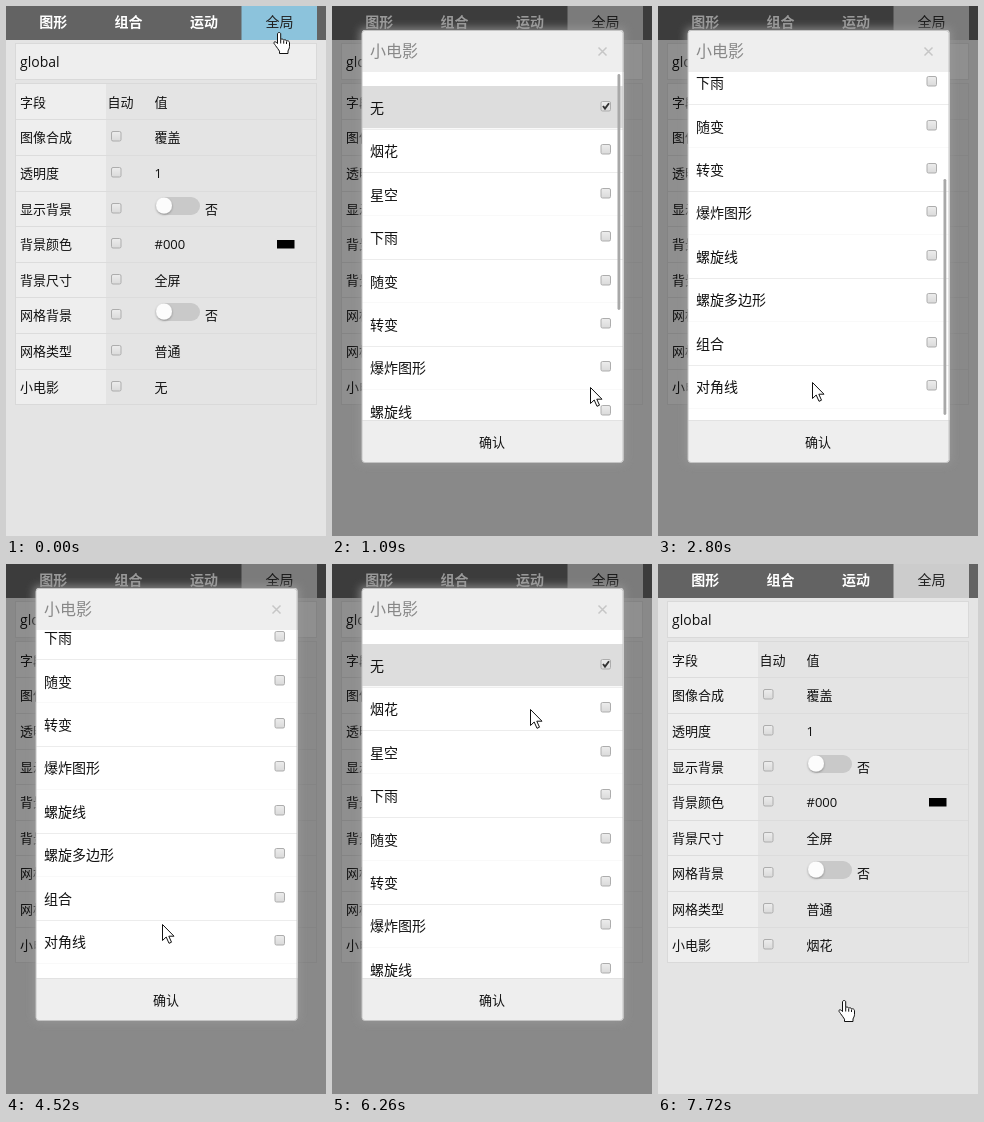
These frames come from a looping animation (320x530 px, 8000 ms). An HTML page:

```html
<!DOCTYPE html>
<html lang="zh-CN">
<head>
<meta charset="utf-8">
<title>全局设置</title>
<style>
html, body { margin: 0; width: 100%; height: 100%; overflow: hidden; background: #e4e4e4; }
svg { display: block; width: 100%; height: 100%; }
text { font: 13px "Open Sans", "Noto Sans CJK SC", "Noto Sans CJK", sans-serif; fill: #111; white-space: pre; }
.tab { font-size: 14px; font-weight: 600; fill: #fff; text-anchor: middle; }
.tab.on { font-weight: 400; fill: #222; }
.item { font-size: 14px; }
.title { font-size: 16px; fill: #888; }
.mid { text-anchor: middle; }
</style>
</head>
<body>
<svg viewBox="0 0 320 530">
  <defs>
    <linearGradient id="box" x2="0" y2="1"><stop stop-color="#ededed"/><stop offset="1" stop-color="#dadada"/></linearGradient>
    <filter id="blur" x="-20%" y="-20%" width="140%" height="140%"><feGaussianBlur stdDeviation="4"/></filter>
    <filter id="soft" x="-30%" y="-30%" width="160%" height="160%"><feDropShadow dx="0" dy="1" stdDeviation="1" flood-opacity=".35"/></filter>
    <clipPath id="view"><rect x="30" y="66" width="261" height="348"/></clipPath>
  </defs>
  <g id="page"></g>
  <g id="modal">
    <rect width="320" height="530" opacity=".4"/>
    <rect x="28" y="22" width="265" height="436" rx="4" fill="#999" opacity=".8" filter="url(#blur)"/>
    <rect x="30" y="24" width="261.500" height="432.500" rx="3" fill="#eee"/>
    <rect x="30" y="66" width="261.500" height="348" fill="#fff"/>
    <g clip-path="url(#view)">
      <g id="list"></g>
      <rect id="bar" x="285.500" width="2.800" height="236" rx="1.400" fill="#a8a8a8"/>
    </g>
    <path d="M30 414.500H291" stroke="#e2e2e2"/>
    <rect x="30" y="24.500" width="261" height="432" rx="3" fill="none" stroke="#c4c4c4"/>
    <text class="title" x="38" y="51">小电影</text>
    <path d="M266.500 41.500l8 8m0-8l-8 8" stroke="#c6c6c6" stroke-width="1.500"/>
    <text class="mid" x="160" y="441">确认</text>
  </g>
  <g id="cursor" fill="#fff" stroke="#111" stroke-linejoin="round">
    <path id="arrow" d="M.5 .5V16.500L4.200 13 7 19.300 9.500 18.200 6.800 12.200H12Z"/>
    <g id="hand" transform="translate(-5 0)">
      <path d="M4.500 2c0-2 3.200-2 3.200 0v5.500c.8-.8 2.600-.5 3 .6c1-.7 2.500-.3 2.800.8c1.300-.4 3 .2 3 1.800v3.800c0 2-1 3-1.500 4.500v2.500H6.500v-2.300c-1-2-2.800-3.700-4-5.700c-1-1.500-2-2.300-1.500-3.200c.8-1.100 2.500-.2 3.500 1.300z"/>
      <path d="M7.700 7.500v4M10.700 8.500v3.200M13.500 9.500v2.500" fill="none"/>
    </g>
  </g>
</svg>
<script>
const LOOP = 8000, OPEN = 1090, PICK = 6270, CONFIRM = 7420, CLOSE = 7570;
const ROW = 43.45, films = "无 烟花 星空 下雨 随变 转变 爆炸图形 螺旋线 螺旋多边形 组合 对角线".split(" ");
const $ = id => document.getElementById(id);
const show = (id, on) => $(id).setAttribute("visibility", on ? "inherit" : "hidden");
const text = (x, y, s, attrs = "") => `<text x="${x}" y="${y}" ${attrs}>${s}</text>`;
const rect = (x, y, w, h, fill, attrs = "") => `<rect x="${x}" y="${y}" width="${w}" height="${h}" fill="${fill}" ${attrs}/>`;
const check = (x, y) => rect(x + .5, y + .5, 9.500, 9.500, "url(#box)", 'rx="1.500" stroke="#adadad"');
const line = (x1, x2, y, color) => `<path d="M${x1} ${y}H${x2}" stroke="${color}"/>`;

function buildPage() {
  let s = rect(0, 0, 320, 530, "#e4e4e4") + rect(0, 0, 320, 34, "#636363");
  s += rect(235.500, 0, 75.500, 34, "#ccc", 'id="tab"');
  ["图形", "组合", "运动", "全局"].forEach((name, i) =>
    s += text(47.200 + 75.400 * i, 21, name, `class="tab${i == 3 ? " on" : ""}"`));
  s += rect(9.500, 37.500, 301, 36, "#eee", 'stroke="#d9d9d9"') + text(14, 61, "global", 'class="item"');
  s += rect(9.500, 77.500, 301, 321, "#e4e4e4", 'stroke="#d9d9d9"') + rect(10, 78, 90, 320, "#eee");

  const rows = [["字段", "值"], ["图像合成", "覆盖"], ["透明度", "1"], ["显示背景"], ["背景颜色", "#000"],
    ["背景尺寸", "全屏"], ["网格背景"], ["网格类型", "普通"], ["小电影", "无"]];
  rows.forEach(([label, value], i) => {
    const y = Math.round(95.800 + 35.600 * i);
    s += text(14, y + 5, label);
    s += i ? check(105, y - 6) + line(10, 310, y - 17.500, "#dcdcdc") : text(101.500, y + 5, "自动");
    if (value) s += text(148.500, y + 5, value, i == 8 ? 'id="film"' : "");
    else s += rect(150, y - 12, 44, 18, "#c9c9c9", 'rx="9"')
      + `<circle cx="158" cy="${y - 3.500}" r="8" fill="#fcfcfc" filter="url(#soft)"/>` + text(199, y + 5, "否");
  });
  $("page").innerHTML = s + rect(271, 234, 17.500, 8.500, "#000");
}

function buildList() {
  let s = rect(30, 80, 261, 43.500, "#ddd", 'id="chosen"');
  films.forEach((name, i) => {
    const mid = 101.700 + ROW * i;
    s += line(30, 291, Math.round(80 + ROW * (i + 1)) - .5, i % 2 ? "#ececec" : "#f9f9f9");
    s += text(38, mid + 5, name, 'class="item"') + check(268.500, Math.round(mid - 7));
  });
  s += '<path id="tick" d="M271 100l2 2.600 4-5.300" fill="none" stroke="#333" stroke-width="1.900"/>';
  $("list").innerHTML = s;
}

// Share of a move done at time t, when it runs from a to b in n visible steps
const part = (t, a, b, n) => t < a ? 0 : t >= b ? 1 : (1 + Math.floor((t - a) / (b - a) * (n - 1))) / n;

// Each move: [start, end, steps, ...target]
const track = (from, moves, ease) => t => moves.reduce((v, [a, b, n, ...to]) => {
  const p = ease(part(t, a, b, n));
  return v.map((c, i) => c + (to[i] - c) * p);
}, from);

const smooth = p => p * p * (3 - 2 * p);
const pointer = track([272, 26], [
  [120, 810, 6, 263, 379], [1090, 1090, 1, 258, 381], [1240, 2110, 7, 154, 376],
  [3230, 3650, 4, 155, 363], [4520, 4520, 1, 156, 360], [5330, 5600, 3, 195, 206],
  [5720, 6020, 3, 198, 145], [6400, 7030, 6, 187, 421], [7280, 7280, 1, 187, 422],
  [7420, 7720, 3, 185, 436]], smooth);
const scroll = track([0], [[2260, 2920, 6, 158], [4920, 5200, 3, 0]], p => 1 - (1 - p) ** 2.200);
const barFade = track([1], [[1240, 1640, 4, 0], [2260, 2260, 1, 1], [3230, 3650, 4, 0],
  [4920, 4920, 1, 1], [5200, 5550, 3, 0]], p => p);

function draw(now) {
  const t = now % LOOP, [x, y] = pointer(t), [top] = scroll(t);
  const open = t >= OPEN && t < CLOSE, arrow = t >= OPEN && t < CONFIRM;
  const pick = t >= PICK ? 1 : 0, shift = `translate(0 ${pick * ROW})`;
  show("modal", open);
  show("arrow", arrow);
  show("hand", !arrow);
  $("cursor").setAttribute("transform", `translate(${Math.round(x)} ${Math.round(y)})`);
  $("tab").setAttribute("fill", t < OPEN && y < 34 ? "#8cc3dc" : "#ccc");
  $("film").textContent = films[t >= CLOSE ? 1 : 0];
  $("list").setAttribute("transform", `translate(0 ${-Math.round(top)})`);
  $("chosen").setAttribute("transform", shift);
  $("tick").setAttribute("transform", shift);
  $("bar").setAttribute("y", 68 + top * 107 / 158);
  $("bar").setAttribute("opacity", barFade(t)[0]);
}

buildPage();
buildList();
const start = performance.now();
(function frame() {
  draw(performance.now() - start);
  requestAnimationFrame(frame);
})();
</script>
</body>
</html>
```
